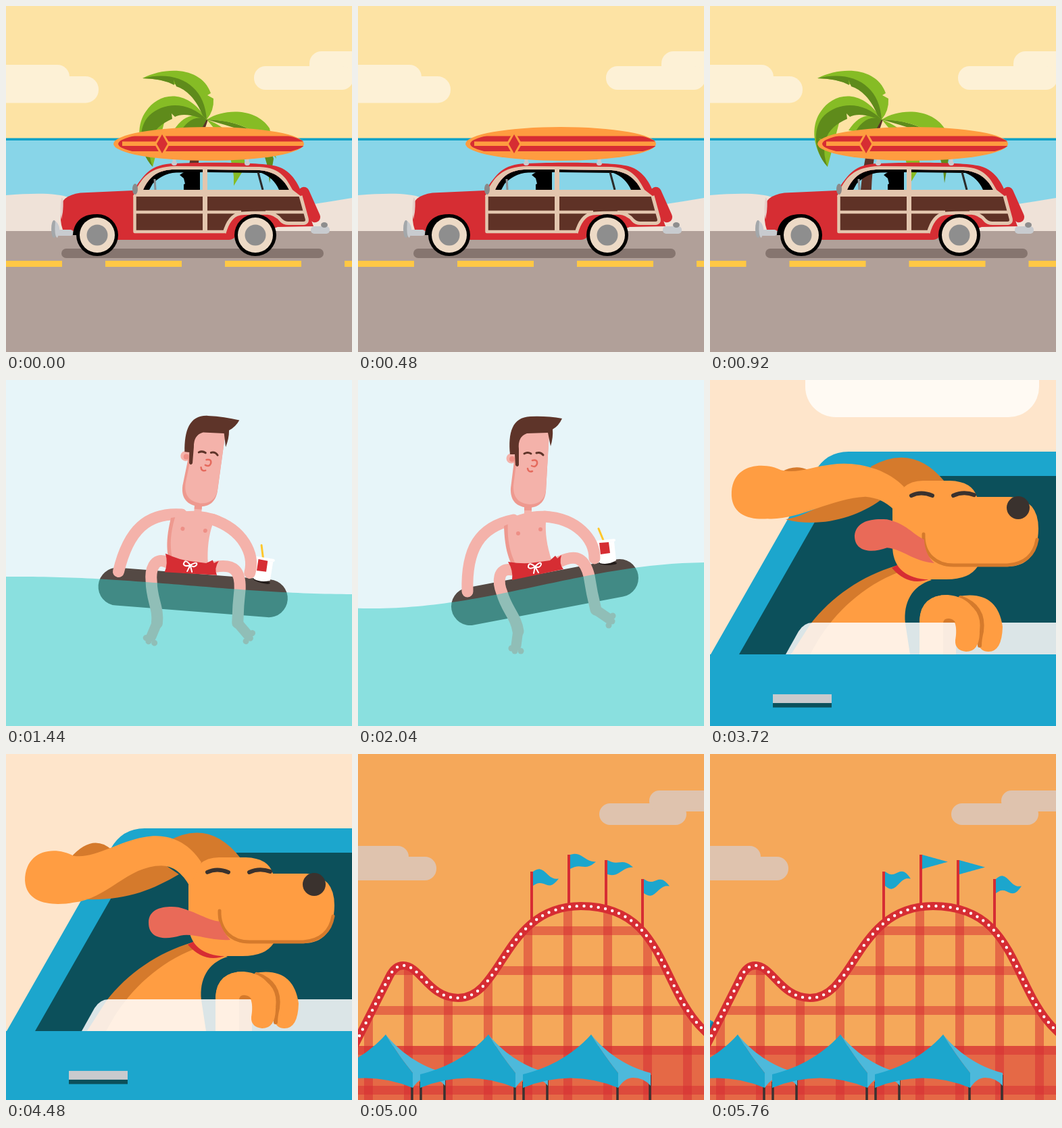
An HTML page with a canvas that plays this animation: 512 by 512 pixels, repeating every 5.8 s.

```html
<!DOCTYPE html>
<html lang="en">
<head>
<meta charset="utf-8">
<title>Summer loop</title>
<style>
html, body { margin: 0; width: 100%; height: 100%; overflow: hidden; }
canvas { display: block; width: 100vw; height: 100vh; }
</style>
</head>
<body>
<canvas id="stage" width="512" height="512"></canvas>
<script>
const g = document.getElementById('stage').getContext('2d');
const TAU = Math.PI * 2, LOOP = 5800, STEP = 40;
const RED = '#d62d33', BLUE = '#1ca6cd', ORANGE = '#ff9d42', SHADE = '#d57a2c',
  SKIN = '#f4b2aa', TEAL = '#0c505b', INK = '#3a322e', CHROME = '#c8cbcf';

function fill(color, d, rule) {
  g.fillStyle = color;
  g.fill(new Path2D(d), rule || 'nonzero');
}
function line(color, width, d, cap) {
  g.strokeStyle = color;
  g.lineWidth = width;
  g.lineCap = cap || 'round';
  g.lineJoin = 'round';
  g.stroke(new Path2D(d));
}
function rect(color, x, y, w, h) {
  g.fillStyle = color;
  g.fillRect(x, y, w, h);
}
function round(color, x1, y1, x2, y2, r) {
  g.fillStyle = color;
  g.beginPath();
  g.roundRect(x1, y1, x2 - x1, y2 - y1, r);
  g.fill();
}
function oval(color, x, y, rx, ry = rx) {
  g.fillStyle = color;
  g.beginPath();
  g.ellipse(x, y, rx, ry, 0, 0, TAU);
  g.fill();
}
function group(draw) {
  g.save();
  draw();
  g.restore();
}
function spin(deg, x, y) {
  g.translate(x, y);
  g.rotate(deg * Math.PI / 180);
  g.translate(-x, -y);
}
// Blend two paths that share the same commands.
function blend(a, b, u) {
  const to = b.match(/-?[\d.]+/g);
  let i = 0;
  return a.replace(/-?[\d.]+/g, v => +v + (to[i++] - v) * u);
}

// ---------- Beach road ----------
function palm() {
  const dark = '#5f8b1b', light = '#86bc25';
  fill('#5c3328', 'M292 168L299 168Q282 212 281 300L264 300Q268 215 292 168Z');
  fill(light, 'M297 168C330 180 357 210 353 240L337 266Q340 215 297 168Z');
  fill(dark, 'M297 168C330 168 385 180 396 226L390 262Q386 200 350 184Q325 176 297 168Z');
  fill(light, 'M297 168C325 150 372 152 390 181L400 226L384 205C368 178 335 170 297 168Z');
  fill(light, 'M297 168C280 156 262 162 248 184L262 186Z');
  fill(dark, 'M297 168C280 160 265 172 256 190L285 190Z');
  fill(light, 'M217 238C190 205 195 172 207 156C225 128 268 120 297 168L240 150Z');
  fill(dark, 'M217 238C194 212 196 178 212 162C235 140 272 142 297 168L285 165C270 160 258 160 250 164L245 159L246 167C230 174 219 183 214 198L204 196L213 204Q210 220 217 238Z');
  fill(light, 'M202 107C240 88 290 92 303 129L298 132L307 137Q308 155 297 168C290 138 262 108 202 107Z');
  fill(dark, 'M202 107C255 94 294 118 297 168L291 162C282 138 266 123 252 119L248 109L249 117Q230 107 202 107Z');
}

function wheel(x) {
  oval('#000', x, 339, 31);
  oval('#eddac6', x, 339, 26);
  oval('#8e8e8e', x, 339, 15.5);
}

function wagon() {
  const tan = '#e3c6ae', wood = '#5f3226';
  const front = 'M203 272C212 252 225 242 250 242L291 242L291 272Z';
  const rear = 'M298 242L375 243C400 245 412 258 419 272L298 272Z';
  const trim = 'M323 336Q330 311 345 307.500Q350 306 386 306Q399 307 407 317Q411 321.500 418 321.500H440Q447 321 445 314L436 281';
  round('#86756f', 82, 359, 470, 373, 7);

  // cabin seen through the glass
  fill('#000', 'M203 272C212 252 225 242 250 242L291 242L291 246L252 246.500C236 247 224 256 217 263L212 272Z');
  line('#8b8f92', 3, 'M220 256L221 272', 'butt');
  fill('#000', 'M257 250L263 246L287 246L287 272L263 272L263 264L265 263L263 255Z');
  fill('#000', 'M298 242L375 243C400 245 412 258 419 272L404 272Q396 254 378 247L298 246Z');
  line('#2b2b2b', 3, 'M373 246L380 272', 'butt');

  round(CHROME, 451, 326, 479, 337, 5);
  oval('#8e8e8e', 471, 324, 5, 4);
  group(() => {
    spin(-24, 449, 294);
    round(RED, 441, 266, 457, 322, 8);
  });
  fill(RED, 'M82 300Q80 281 110 276.500L188 273C205 250 212 234 250 233C300 231 375 231 400 237C425 244 435 268 440 284L455 326L402 327L369 339L341 339Q337 346 330 346L160 346L135 325L101 333L84 331Q79 318 82 300Z' + front + rear, 'evenodd');

  // wooden sides
  rect(wood, 191, 281, 103, 53);
  fill(wood, trim + 'H295V336Z');
  fill(tan, 'M188 282C200 252 214 238 250 237L375 238C408 239 416 258 424 272L437 282Z' + front + rear, 'evenodd');
  line(tan, 4.5, 'M190.500 280V334H323M192 305H348M384 305H441', 'butt');
  line(tan, 7, 'M294.500 240V336', 'butt');
  line(tan, 5, trim, 'butt');

  oval('#8a8a8a', 191, 271, 4, 8);
  fill('#e6cfc9', 'M82 284Q86 282 84 305L82 316Q79 300 82 284Z');
  oval('#a3a7aa', 71, 330, 4, 13);
  fill(CHROME, 'M73 318Q84 328 76 343Q71 341 73 318Z');
  round(CHROME, 75, 331, 99, 340, 4);
  fill('#000', 'M99 339C101 300 150 300 164 330L135 339Z');
  wheel(135);
  wheel(369);
}

function board() {
  for (const x of [249, 357]) {
    round(CHROME, x - 2.5, 220, x + 2.5, 236, 2);
    oval(CHROME, x, 233, 4, 3);
  }
  oval('#ff9c40', 300, 204, 141, 25);
  group(() => {
    g.beginPath();
    g.ellipse(304, 204, 138, 21, 0, 0, TAU);
    g.clip();
    rect(RED, 160, 192.5, 290, 8);
    rect(RED, 160, 207, 290, 8);
    rect(RED, 160, 192.5, 12, 22.5);
  });
  const diamond = 'M231 190L239 204L231 218L223 204Z';
  line('#ff9c40', 6, diamond);
  fill(RED, diamond);
}

function road(t) {
  const n = t / STEP, cloud = '#fdf1d6';
  rect('#fde3a4', 0, 0, 512, 196);
  round(cloud, -30, 87, 94, 130, 18);
  round(cloud, -30, 104, 137, 143.5, 19.5);
  round(cloud, 449, 67, 560, 106, 18);
  round(cloud, 367, 89, 514, 124, 17);
  rect('#88d5e8', 0, 196, 512, 138);
  rect('#0ba2c8', 0, 195.5, 512, 3.5);
  fill('#efe2d8', 'M0 280C40 277 75 276 95 284Q180 310 300 312Q400 303 512 284V334H0Z');
  rect('#b1a099', 0, 333, 512, 179);
  const shift = n * 29.5 % 177;
  for (let x = shift - 207; x < 512; x += 177) rect('#ffc845', x, 377, 113, 9);
  group(() => {
    g.beginPath();
    g.rect(0, 0, 512, 300);
    g.clip();
    g.translate((n * 43 + 516) % 1032 - 516, 0);
    palm();
  });
  wagon();
  board();
}

// ---------- Floating ----------
function head() {
  const hair = '#5e3429', pink = '#e56a5d';
  rect(SKIN, 246, 180, 11, 22);
  rect('#ee998f', 246, 187, 11, 6);
  oval(SKIN, 227, 116, 7.5);
  oval('#ee8f86', 228, 117, 4);
  fill('#ee998f', 'M236 80L283 76L278 165C276 185 262 189 252 189C236 188 225 180 226 160Z');
  fill(SKIN, 'M240 78L283 76L278 163C276 180 264 184 254 184C240 183 229 176 230 156Z');
  fill(hair, 'M225 110C222 78 228 55 255 54Q280 53 302 57Q297 68 288 73Q289 85 285 98L281 78L250 79Q236 84 238 102V126Q236 130 233 126L232 110Z');
  line(hair, 3, 'M246 109Q251 106 256 109M264 108Q270 106 274 111');
  line(pink, 2.5, 'M258 119Q266 117 265 124Q263 130 257 127M251 131Q252 137 258 135');
}

function swimmer(extra) {
  line('#544944', 56, 'M166 335L387 293');
  oval('#241d1b', 370, 271, 13, 3);
  line('#ffc72c', 3, 'M356 220L363 237');
  fill('#fff', 'M352 242L379 239L382 267Q370 274 358 271Z');
  line('#fff', 4, 'M351 240L379 237');
  fill(RED, 'M357 241L371 240L373 256L359 258Z');

  line(SKIN, 17, 'M228 281C206 277 207 300 213 315C220 340 234 350 237 372');
  line(SKIN, 15, 'M237 370L234 393M352 340L371 353');
  for (const [x, y] of [[227, 397], [232, 401], [241, 401], [371, 363], [376, 357], [377, 349]]) oval(SKIN, x, y, 4.5);
  line(SKIN, 17, 'M298 269C325 256 336 266 342 290C345 310 349 328 352 340');

  line(SKIN, 17, 'M230 207C180 217 160 250 162 313M276 202C324 205 350 235 350 264');
  fill('#ee998f', 'M216 216C217 248 222 262 229 277L270 272L262 196Z');
  fill(SKIN, 'M222 206C220 240 226 258 235 276L287 268C279 245 277 225 278 210L286 195C262 191 240 198 222 206Z');
  oval('#ee8f86', 237, 227, 3);
  oval('#ee8f86', 270, 221, 3);
  fill(RED, 'M222 269Q245 273 262 270L284 267L292 260L295 264L301 259Q297 272 304 280L228 296Q230 282 222 269Z');
  line('#fff', 2, 'M262 276Q252 268 252 277Q255 281 262 276Q271 267 271 273Q269 279 262 276L260 286M262 276L267 285');
  group(() => {
    spin(-0.7 * extra, 252, 194);
    head();
  });
}

function swim(t) {
  const k = Math.cos(TAU * (t - 2040) / 1920), extra = 11 * (1 - k);
  rect('#e7f5f9', 0, 0, 512, 512);
  group(() => {
    spin(extra, 275, 315);
    swimmer(extra);
  });
  g.fillStyle = 'rgba(46,204,198,.5)';
  g.beginPath();
  g.moveTo(0, 512);
  for (let x = 0; x <= 512; x += 8) g.lineTo(x, 304 + 34 * k * Math.cos(TAU * (x - 20) / 1000));
  g.lineTo(512, 512);
  g.fill();
}

// ---------- Camp ----------
function tree(x, top, base, half, left, right, trunk, bark) {
  const at = (side, f, w, dy = 0) => `L${x + side * half * f * w} ${top + (base - top) * f + dy}`;
  const edge = (s, a, b) => at(s, a, .95) + at(s, a, .35, 9) + at(s, a, 1.02, 9) +
    at(s, b, 1) + at(s, b, .25, 12) + at(s, b, 1.03, 12) + at(s, 1, 1);
  const mid = `L${x} ${base}Z`;
  fill(left, `M${x} ${top}` + at(-1, .58, 1) + at(-1, .58, .35, 12) + at(-1, .6, 1.05, 8) + at(-1, 1, 1) + mid);
  fill(right, `M${x} ${top}` + edge(1, .4, .74) + mid);
  const start = top + (base - top) * .28, w = half * .09;
  fill(bark, `M${x} ${start}L${x + w} ${trunk}H${x - w}Z`);
}

const stars = [[241, 31], [302, 54], [72, 186], [195, 85], [265, 119], [322, 136], [342, 183], [337, 227],
  [420, 228], [192, 140], [92, 158], [40, 178], [281, 76], [358, 10], [373, 15], [257, 181], [31, 126], [154, 69]];

function camp(t) {
  const cloud = '#97776a', pine = ['#075a4d', '#174a47'], mint = ['#068578', '#1d7273'], bark = '#2a211f';
  rect('#005e70', 0, 0, 512, 512);
  stars.forEach(([x, y], i) => {
    g.globalAlpha = i < 3 ? .95 : .42 + .18 * Math.sin(t / 150 + i * 2);
    oval('#d9f2f4', x, y, i < 3 ? 2 : 2.3);
  });
  for (let i = 0; i < 28; i++) {
    g.globalAlpha = .35 + .2 * Math.sin(t / 150 + i);
    oval('#d9f2f4', i * 197.3 % 512, i * 83.7 % 235, 1);
  }
  g.globalAlpha = 1;
  fill('#fff', 'M230 16C195 17 186 58 205 77Q228 95 256 77C216 81 205 39 230 16Z');
  round(cloud, 0, 16, 126, 47, 15);
  round(cloud, 58, 37, 184, 67, 15);
  round(cloud, 374, 73, 516, 107, 17);
  round(cloud, 416, 92, 540, 126, 16);
  fill('#174d47', 'M0 290Q90 268 200 265C310 261 410 241 512 235V400H0Z');
  fill('#72afa6', 'M0 319C110 315 240 320 350 333L400 360H0Z');
  fill('#174d45', 'M0 330C120 328 200 357 330 359L350 333L512 333V512H0Z');
  tree(13, 168, 330, 32, ...pine, 340, bark);
  tree(132, 52, 318, 47, ...pine, 342, bark);
  tree(486, 78, 294, 45, ...pine, 314, bark);
  tree(522, 190, 297, 27, ...mint, 320, bark);
  tree(57, 139, 355, 46, ...mint, 374, '#3a302e');
  tree(199, 173, 336, 35, ...mint, 352, '#3a302e');

  fill('#5a2056', 'M320 398C330 335 370 300 412 296C470 298 505 350 512 398Z');
  fill('#4a164a', 'M412 296C442 310 455 360 453 398H512C505 350 470 298 412 296Z');
  fill('#6d2c53', 'M320 398C332 345 362 322 395 324C418 328 425 360 425 398Z');
  line('#4f1a4c', 4, 'M395 311Q374 345 373 397', 'butt');

  oval('#9a7e50', 245, 397, 49, 5);
  round('#3a1715', 209, 376, 281, 397, 10);
  round('#3a1715', 221, 364, 270, 386, 10);
  group(() => {
    const a = t - 2920;
    g.translate(245, 378);
    g.transform(1, 0, .14 * Math.sin(a / 75), 1 + .07 * Math.sin(a / 55), 0, 0);
    g.translate(-245, -378);
    fill('#ffc545', 'M239 326L251 330L252 337Q266 342 266 364Q262 378 246 378Q228 377 225 363Q225 353 236 342Q238 334 239 326Z');
    fill('#ff9a3c', 'M250 348Q263 360 258 374Q246 381 236 374Q231 362 240 359Z');
  });
  const black = '#1d1512';
  tree(18, 278, 494, 47, black, black, 516, black);
  tree(112, 338, 513, 37, black, black, 520, black);
  tree(505, 290, 481, 55, black, black, 498, black);
  rect(black, 499, 480, 7, 18);
}

// ---------- Dog in the window ----------
function dog(t) {
  const u = .5 - .5 * Math.cos(TAU * (t / STEP - 93.5) / 12);
  rect('#fee5cb', 0, 0, 512, 512);
  const x = 141 - (t - 3720);
  round('#fffaf3', x, -60, x + 346, 55, 45);
  g.translate(0, 4 * u);
  fill(BLUE, 'M1 406L155 136Q172 106 205 106H512V520H0V406Z');
  fill(TEAL, 'M43 406L186 156Q194 142 208 142H512V406Z');
  rect('#c9cacd', 93, 465, 87, 13);
  rect(TEAL, 93, 478, 87, 6.5);

  fill(ORANGE, 'M120 406L150 362C180 325 225 293 275 275L328 296C298 305 286 330 289 360L296 406Z');
  fill(SHADE, 'M120 406L148 362C180 320 225 290 275 275L280 284C225 305 185 345 160 385L148 406Z');
  fill(ORANGE, 'M310 406V357Q312 318 352 318L364 340V406Z');
  rect(SHADE, 345, 359, 19, 47);
  fill('rgba(255,255,255,.85)', 'M112 406L131 372Q139 359 152 359H512V406Z');
  fill(ORANGE, 'M368 320Q425 310 433 365Q432 402 412 402Q400 402 397 390Z');
  line(SHADE, 6, 'M371 322Q407 335 402 372Q399 384 399 393');
  fill(ORANGE, 'M310 359V355Q312 318 352 318Q398 322 399 375Q398 402 379 402Q362 400 363 385C366 370 364 353 355 353Q346 354 345 359Z');
  fill(SHADE, 'M345 359Q346 352 354 353Q361 354 363 359Z');

  fill(SHADE, blend('M238 128Q300 93 347 150L300 180L250 165Z', 'M238 126Q300 90 347 150L300 180L250 165Z', u));
  fill(SHADE, blend('M105 136Q126 124 145 133L140 146Z', 'M95 150Q128 112 157 138L142 156Z', u));
  fill(RED, 'M269 278L280 272L326 294Q294 307 269 278Z');
  fill(ORANGE, 'M270 190Q280 149 315 149H355Q388 150 395 173H445Q486 177 486 220Q485 276 440 276H396Q384 295 350 295H318Q270 290 270 245Z');
  line(SHADE, 5, 'M316 228C315 258 335 274 360 274H440Q478 271 484 236');
  fill('#e96a58', blend(
    'M332 271C300 268 285 250 262 248C240 256 214 255 214 230C216 208 240 204 262 206C290 212 300 228 317 236Q318 258 332 271Z',
    'M332 271C300 273 280 261 258 265C235 272 211 270 211 246C211 224 235 221 255 223C285 231 295 241 316 244Q320 258 332 271Z', u));
  oval(INK, 456, 189, 17);
  line(INK, 6, 'M298 171Q312 164 329 171M360 171Q375 164 391 170');
  fill(SHADE, blend(
    'M112 206C160 219 215 205 252 178L230 168C180 170 150 200 112 206Z',
    'M112 211C175 214 215 198 256 174L232 158C180 158 150 205 112 211Z', u));
  fill(ORANGE, blend(
    'M287 158C260 130 215 120 180 125C150 128 130 139 105 133C85 122 35 120 32 165C30 200 60 207 85 205C130 208 180 175 230 173Q255 175 272 192Z',
    'M289 156C270 126 240 112 205 119C165 126 130 152 100 147C70 131 28 139 28 184C30 221 75 221 100 216C150 211 180 161 230 161Q255 161 272 192Z', u));
}

// ---------- Coaster ----------
const rail = 'M-60 540L46 330Q54 313 67 313C92 313 105 361 148 361C215 361 215 225 330 225C455 225 445 345 512 409L580 474';
const rails = document.createElementNS('http://www.w3.org/2000/svg', 'path');
rails.setAttribute('d', rail);
const railLength = rails.getTotalLength();

function train(t) {
  const nose = 380 - (t - 5400) * 1.97;
  for (let i = 0; i < 10; i++) {
    const s = nose + 24 + i * 49;
    if (s < 22 || s > railLength - 22) continue;
    const a = rails.getPointAtLength(s - 18), b = rails.getPointAtLength(s + 18);
    group(() => {
      g.translate((a.x + b.x) / 2, (a.y + b.y) / 2);
      g.rotate(Math.atan2(b.y - a.y, b.x - a.x));
      fill(BLUE, 'M-23 -7Q-24 -17 -15 -18L-8 -14H10L15 -22H22V-7Z');
      rect('#137fa0', -20, -9, 41, 4);
    });
  }
}

function flag(x, top, foot, phase, t) {
  line(RED, 4, `M${x} ${top}V${foot}`, 'butt');
  const sway = Math.sin(TAU * (t - 5760) / 480 + phase);
  const edge = [], low = [];
  for (let i = 0; i <= 12; i++) {
    const u = i / 12, px = x + 2 + 38 * u;
    const y = top + 10.5 - 4.5 * sway * Math.sin(u * TAU);
    const h = 10.5 * (1 - u) + 4 * Math.abs(sway) * Math.sin(u * Math.PI);
    edge.push(`${px} ${y - h}`);
    low.unshift(`${px} ${y + h}`);
  }
  fill(BLUE, 'M' + edge.concat(low).join('L') + 'Z');
}

function tent(x) {
  group(() => {
    g.translate(x, 415);
    line('#3a3230', 3.5, 'M-100 70V100M39 70V100M87 60V100', 'butt');
    fill('#4db9db', 'M0 0Q18 30 40 57V79Q50 64 62 64Q78 64 88 76V57C50 47 20 25 0 0Z');
    fill(BLUE, 'M0 0C-30 34 -70 52 -101 59V79Q-30 50 40 79V57Q18 30 0 0Z');
  });
}

function coaster(t) {
  const cloud = '#dfc3ae', beam = 'rgba(214,45,51,.5)';
  rect('#f5a85a', 0, 0, 512, 512);
  round(cloud, -30, 136, 75, 175, 16);
  round(cloud, -30, 152, 116, 187, 17);
  round(cloud, 357, 73, 486, 105, 16);
  round(cloud, 431, 54, 550, 85, 15);
  group(() => {
    g.clip(new Path2D(rail + 'V560H-60Z'));
    for (let x = 9; x < 512; x += 59) rect(beam, x, 200, 13, 312);
    for (let y = 255; y < 512; y += 59) rect(beam, 0, y, 512, 13);
  });
  rect(beam, 0, 432, 512, 80);
  flag(257, 174, 248, -Math.PI / 2, t);
  flag(312, 149, 224, 0, t);
  flag(367, 157, 228, Math.PI, t);
  flag(421, 185, 262, Math.PI / 2, t);
  train(t);
  line(RED, 12, rail);
  g.setLineDash([0, 10.6]);
  line('#fff', 4.4, rail);
  g.setLineDash([]);
  for (const x of [41, 193, 345]) tent(x);
}

const scenes = [[1200, road], [2440, swim], [3600, camp], [4800, dog], [LOOP, coaster]];

function frame(now) {
  const t = Math.floor(now % LOOP / STEP) * STEP;
  group(() => scenes.find(s => t < s[0])[1](t));
  requestAnimationFrame(() => frame(performance.now()));
}
frame(performance.now());
</script>
</body>
</html>
```
